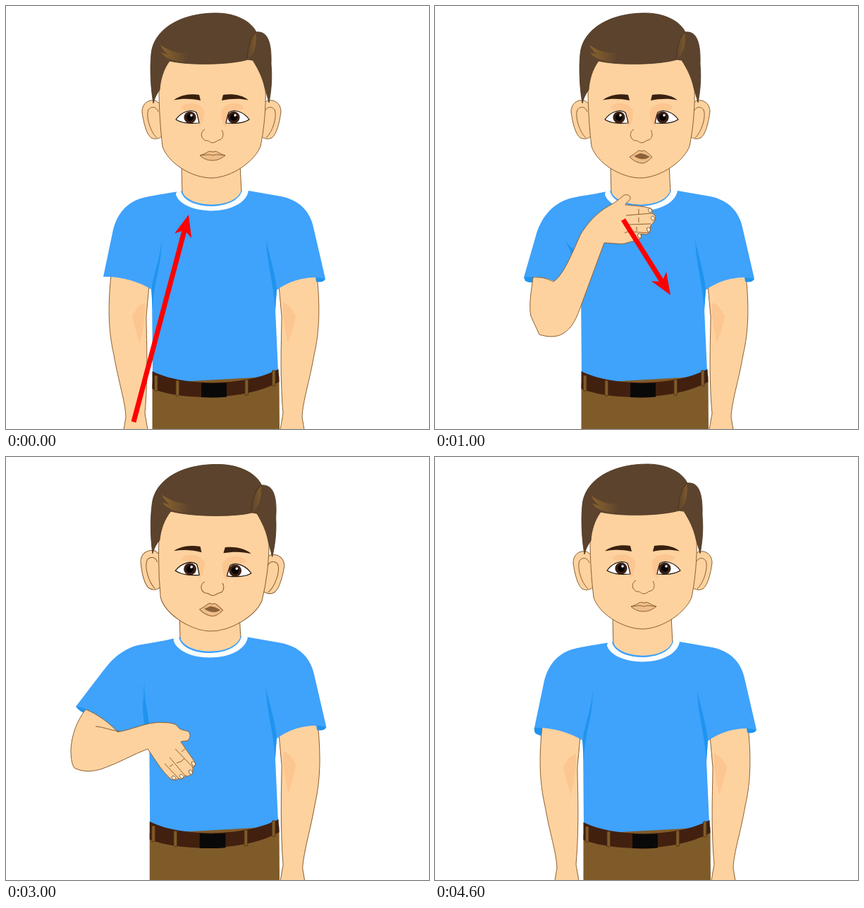
These frames come from a looping animation (600x600 px, 5 s). An HTML page:

```html
<!DOCTYPE html>
<html lang="en">
<head>
<meta charset="utf-8">
<title>Signing boy</title>
<style>
  html, body { margin: 0; width: 100%; height: 100%; overflow: hidden; background: #fff; }
  svg { display: block; width: 100vw; height: 100vh; }
</style>
</head>
<body>
<svg id="stage" viewBox="0 0 600 600">
  <defs>
    <linearGradient id="shineL"><stop stop-color="#8a642d"/><stop offset="1" stop-color="#5c432d"/></linearGradient>
    <linearGradient id="shineR"><stop stop-color="#5c432d"/><stop offset="1" stop-color="#7d5a2d"/></linearGradient>
  </defs>
</svg>
<script>
const SKIN = '#fed29f', LINE = '#8a6033', BLUSH = '#fcc690', HAIR = '#5c432d',
      SHIRT = '#3fa2fb', SHADE = '#1e94ee', PANTS = '#805b2a', BELT = '#42200f';
const STEP = 1000;

const shape = (d, fill, stroke = 'none', width = 1) =>
  `<path d="${d}" fill="${fill}" stroke="${stroke}" stroke-width="${width}" stroke-linejoin="round"/>`;
const skin = d => shape(d, SKIN, LINE);
const line = (d, color = LINE, width = 1) => shape(d, 'none', color, width);
const dot = (x, y, r, fill) => `<circle cx="${x}" cy="${y}" r="${r}" fill="${fill}"/>`;
const group = (content, transform = '') => `<g transform="${transform}">${content}</g>`;
const flip = (content, sum) => group(content, `translate(${sum} 0) scale(-1 1)`);
const both = (content, sum) => content + flip(content, sum);

const MOUTHS = {
  closed:
    shape('M275 212C283 210 286 206 290 206L293 207L297 206C301 207 304 210 311 212C304 217 300 219 293 219C285 219 281 217 275 212Z', '#efbd88', LINE) +
    line('M275 212C284 211 288 210 293 212C298 210 303 211 311 212'),
  open:
    shape('M276 214C284 210 287 205 290 205L293 206L296 205C300 206 303 210 308 214C303 220 298 223 293 223C286 222 281 219 276 214Z', '#efbd88', LINE) +
    shape('M283 213C288 211 291 208 294 210C298 210 300 212 304 214C298 218 291 218 283 213Z', '#8b603b', LINE, .7)
};

function head(mouth) {
  const ear =
    skin('M212 134C200 132 193 140 193 150C195 165 199 182 206 187C212 190 218 188 222 184L220 140Z') +
    line('M216 150C213 142 206 142 202 147C198 157 205 179 214 187');
  const eye =
    shape('M249 143C257 134 275 137 281 148C281 158 279 168 274 172L270 152C262 146 250 150 249 143Z', BLUSH) +
    shape('M241 161C248 151 262 145 270 151C272 156 273 161 274 166C263 167 250 167 241 161Z', '#fff', '#1a1009', 1.2);
  const iris = x => dot(x, 158, 8.6, '#3a1f13') + dot(x, 158, 5, '#080404') + dot(x + 2, 155, 1.8, '#fff');
  const brow = shape('M238 133.5C247 126 262 124 274 126L276 134C262 131 250 131 238 133.5Z', '#38200f');
  return both(ear, 583) +
    skin('M217 118C217 145 219 175 222 199C229 222 263 244 292 244C321 243 353 220 361 199C366 175 369 145 368 115C364 98 358 83 350 70H230C221 85 217 102 217 118Z') +
    shape('M209 138C205 115 204 88 206 68C209 34 246 10 298 10C326 10 348 22 355 37C372 35 377 54 376 82C378 103 376 122 373 137C371 129 369 123 367 116C364 101 357 88 350 77L343 76C320 83 262 85 232 78C223 90 219 105 218 119C214 124 211 130 209 138Z', HAIR, '#4a3521', .8) +
    shape('M219 55C228 62 243 68 258 66C260 71 259 76 251 79C238 79 226 74 220 66L230 69C225 65 221 60 219 55Z', 'url(#shineL)') +
    shape('M354 38C346 45 343 60 342 76C351 72 357 53 354 38Z', 'url(#shineR)') +
    line('M355 37C347 43 343 57 342 75', '#4a3521') +
    both(eye, 586) + iris(261) + iris(323) + both(brow, 582) +
    line('M282 175C276 178 275 187 283 191C288 190 289 194 293 194C298 194 299 190 303 190C309 188 309 180 306 176') +
    MOUTHS[mouth];
}

const LOWERED =
  skin('M440 372C446 425 445 460 437 495C430 535 421 560 420 583L423 601H389L393 578C388 520 391 470 391 440L386 385Z') +
  shape('M393 421C401 422 408 433 411 440C408 455 403 471 400 479C396 462 392 440 393 421Z', BLUSH);

function trousers() {
  const loop = (x, y) => `<rect x="${x}" y="${y}" width="4.5" height="22" rx="1" fill="${PANTS}" stroke="#4b3012" stroke-width=".8"/>`;
  return shape('M207.5 535L387.5 525L388 601H207.5Z', PANTS) +
    shape('M207.5 518C250 540 340 540 386.5 515L387.5 533C340 560 250 560 207.5 543Z', BELT) +
    shape('M277 534.5Q295 536 313 534.5V554.5Q295 556 277 555Z', '#0a0909') +
    loop(210.5, 524) + loop(241, 531) + loop(339, 530) + loop(377.5, 517);
}

function torso() {
  return LOWERED +
    skin('M249 225L250 268C262 290 322 290 334 264L332 225Z') +
    shape('M438 378L453 387Q450 393 440 391Z', SHADE) +
    shape('M240 264C225 268 210 270 200 272L207 400L208 525C250 540 340 538 386 518L382 430L384 403C400 390 425 384 441 385Q448 386 453 387L437 318C432 290 415 275 390 270L344 262L334 263C328 286 262 290 249 263Z', SHIRT) +
    shape('M369 332C374 355 382 380 384 402L382 432C380 395 370 365 369 332Z', SHADE) +
    line('M249 262C254 290 328 290 335 261', SHIRT, 2) +
    shape('M240 264C246 299 337 300 344 262L335 261C329 291 254 292 248 262Z', '#fbfdff') +
    trousers();
}

// Sleeve and folds on the moving side
const SLEEVES = {
  down:
    shape('M242 263.5C215 268 200 270 188 274C165 283 155 302 151 322L138 384C160 383 188 390 206 402L222 330Z', SHIRT) +
    shape('M220.5 331C220 352 211 375 206 402L208 432C209 390 222 365 220.5 331Z', SHADE),
  chest:
    shape('M126 385L128 390Q134 393 140 392V380Z', SHADE) +
    shape('M242 263.5C215 269 200 270 188 274C160 284 148 308 143 326L126 385C145 383 160 386 170 391L207 415L222 330Z', SHIRT) +
    shape('M184 330C188 339 193 342 199 347L195 355Z', SHADE),
  belly:
    shape('M116 374Q120 380 130 382L138 368Z', SHADE) +
    shape('M238 258C215 264 200 264 184 269C155 279 146 310 139 326L116 374Q125 374 130 376C150 383 165 392 175 393L204 390L222 330Z', SHIRT) +
    shape('M181 330C192 349 203 362 205 390L199 391C199 366 191 349 181 330Z', SHADE),
  side:
    shape('M99 354Q104 361 113 364L118 352Z', SHADE) +
    shape('M238 258C215 264 195 264 180 269C155 279 145 295 138 303L99 354Q108 355 113 358C130 365 150 380 158 390L205 385L222 330Z', SHIRT) +
    shape('M197 318C194 338 201 357 203 379H196C193 357 195 338 191 322L195 350C195 338 195 328 197 318Z', SHADE)
};

const nails = list => list.map(([x, y, turn]) =>
  `<ellipse cx="${x}" cy="${y}" rx="3.2" ry="2.3" transform="rotate(${turn} ${x} ${y})" fill="#fff0e0" stroke="${LINE}" stroke-width=".9"/>`).join('');

const ARMS = {
  chest:
    skin('M139 385C136 408 133 425 136 440L148 466C160 470 172 470 181 465C192 458 198 450 206 428L240 336C252 336 266 339 272 336C283 333 291 332 293 327L292 323C300 325 305 323 305 318L306 311C312 306 314 300 312 297L308 294C309 288 306 286 302 286C290 283 278 283 270 282C270 278 278 277 277 271C275 267 270 267 267 269C262 274 255 279 246 284C228 294 214 311 206 325C194 352 182 382 168 391C158 386 149 384 139 385Z') +
    line('M271 297L308 294M274 310L306 309M269 322C277 317 288 323 305 321M289 288V295M289 300V307M286 313V319') +
    nails([[305, 290, 70], [309, 301, 70], [303, 317, 65], [290, 326, 60]]),
  belly:
    skin('M130 376C122 395 119 410 121 425C123 440 126 452 130 460C140 464 151 462 162 459C190 445 222 423 246 409C262 417 275 427 291 431C297 433 302 433 304 430C310 432 316 431 318 427C324 428 329 424 327 420C332 420 334 415 331 410C335 408 335 403 332 399L305 380C306 377 312 378 315 375C317 371 317 366 313 364C308 364 303 366 299 362C283 358 260 364 245 371C225 380 210 390 190 393C168 393 149 381 130 376Z') +
    line('M137 390C153 390 170 395 191 393M300 393L331 410M289 402L327 420M280 414L318 427M312 394L308 400M309 403L307 409M297 413L294 418') +
    nails([[330, 403, 40], [328, 414, 35], [314, 422, 30], [301, 428, 20]]),
  side:
    skin('M113 358C100 375 93 395 92 415C92 430 94 437 97 441C110 448 125 446 137 442C160 434 180 422 201 414C212 430 222 447 234 457C238 459 242 458 245 456C249 458 253 456 254 452C260 454 266 450 265 440C269 439 270 435 266 430L248 404C251 402 254 404 258 402C262 398 262 392 258 389C252 387 246 388 242 380C233 376 222 376 210 377C193 379 178 387 158 390C148 378 130 365 113 358Z') +
    line('M127 382C139 383 148 388 161 389M240 414L265 440M232 426L254 452M225 435L245 456M249 418L254 414M248 432L253 428M242 434L248 432M232 439L237 436') +
    nails([[266, 435, 60], [262, 447, 60], [249, 453, 50], [238, 455, 35]])
};

function arrow(x1, y1, x2, y2) {
  const turn = Math.atan2(y2 - y1, x2 - x1) * 180 / Math.PI;
  const back = -Math.hypot(x2 - x1, y2 - y1);
  return group(shape(`M${back} -3.5H-25L-31 -12.5L0 0L-31 12.5L-25 3.5H${back}Z`, '#f00'),
    `translate(${x2} ${y2}) rotate(${turn})`);
}

const LEAN_HEAD = 'translate(289 247) rotate(2) scale(1.035 1.012) translate(-291 -244)';
const LEAN_BODY = 'translate(387 570) scale(1.021) translate(-387 -570)';
const CUFF = shape('M138 384Q137 391 141 393L151 397L153 380Z', SHADE);

function pose({ arm = 'down', mouth = 'open', lean = false, shift = 0, extra = '', point }) {
  const resting = arm === 'down' ? extra + flip(LOWERED, 590) : '';
  return group(
    resting +
    group(torso(), lean ? LEAN_BODY : '') +
    SLEEVES[arm] +
    group(head(mouth), lean ? LEAN_HEAD : '') +
    (ARMS[arm] || '') +
    (point ? arrow(...point) : ''),
    `translate(${shift} 0)`);
}

const poses = [
  { mouth: 'closed', point: [181, 590, 259, 296] },
  { arm: 'chest', point: [267, 303, 334, 410] },
  { arm: 'belly', lean: true, point: [277, 426, 215, 476] },
  { arm: 'side', lean: true },
  { mouth: 'closed', shift: 3, extra: CUFF }
];

const stage = document.getElementById('stage');
stage.insertAdjacentHTML('beforeend', poses.map(pose).join(''));
const layers = [...stage.children].slice(1);
const start = performance.now();

function draw(now) {
  const current = Math.floor(Math.max(0, now - start) / STEP) % poses.length;
  layers.forEach((layer, i) => { layer.style.display = i === current ? '' : 'none'; });
  requestAnimationFrame(draw);
}
draw(start);
</script>
</body>
</html>
```
